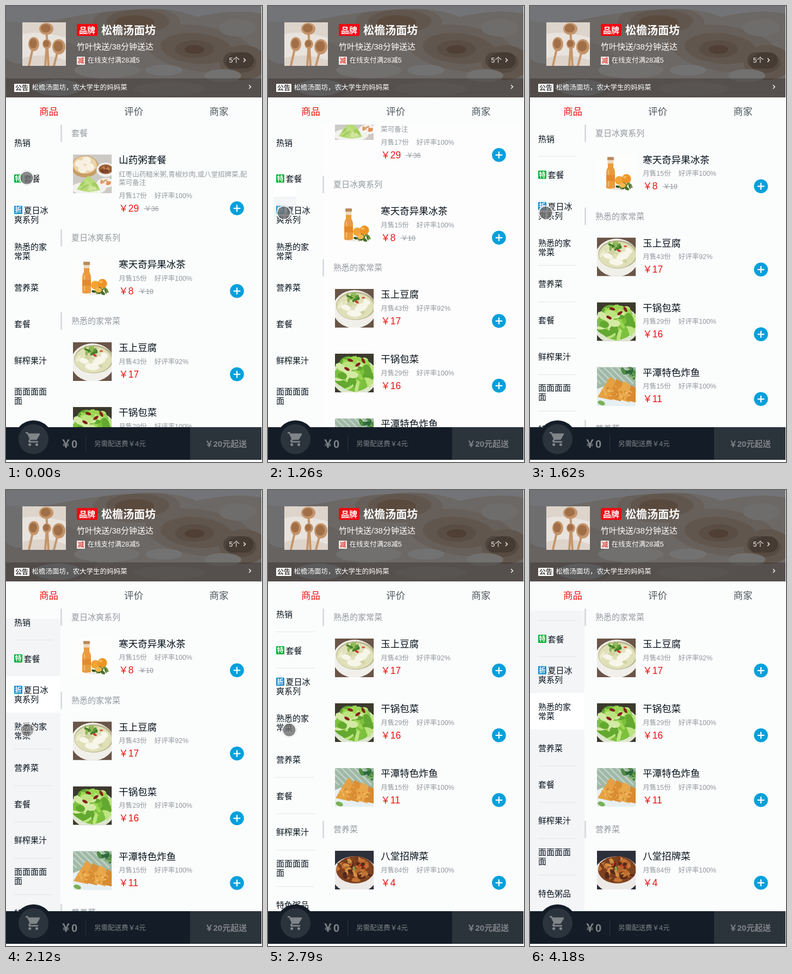
An HTML page for the animation above (4.45 s loop, 470 by 838 pixels).

```html
<!DOCTYPE html>
<html lang="zh-CN">
<head>
<meta charset="utf-8">
<title>点餐页面</title>
<style>
html, body { margin: 0; width: 100%; height: 100%; overflow: hidden; background: #fff; }
#stage { position: fixed; left: 0; top: 0; display: block;
  font-family: "Liberation Sans", "Noto Sans CJK SC", "Noto Sans CJK", sans-serif; }
</style>
</head>
<body>
<svg id="stage" width="470" height="838" viewBox="0 0 470 838"></svg>
<script>
const LOOP = 4450;
const LIGHT = 300;
const stage = document.getElementById('stage');

function add(parent, tag, attrs) {
  const node = document.createElementNS('http://www.w3.org/2000/svg', tag);
  for (const k in attrs) node.setAttribute(k, attrs[k]);
  return parent.appendChild(node);
}
const rect = (p, x, y, width, height, fill, rx = 0) => add(p, 'rect', { x, y, width, height, fill, rx });
const oval = (p, cx, cy, rx, ry, fill, turn = 0) =>
  add(p, 'ellipse', { cx, cy, rx, ry, fill, transform: `rotate(${turn} ${cx} ${cy})` });
const path = (p, d, fill, stroke = 'none', width = 1) =>
  add(p, 'path', { d, fill, stroke, 'stroke-width': width, 'stroke-linecap': 'round' });
// Text is placed by its left edge and vertical middle.
function text(p, str, x, mid, size, fill, weight = 400) {
  const node = add(p, 'text', { x, y: mid + size * 0.38, 'font-size': size, fill, 'font-weight': weight });
  node.textContent = str;
  return node;
}
// A clipped window that keeps stage coordinates.
const pane = (p, x, y, width, height) =>
  add(p, 'svg', { x, y, width, height, viewBox: `${x} ${y} ${width} ${height}` });
const chevron = (p, x, y) => path(p, `M${x - 1.5} ${y - 3}l3 3l-3 3`, 'none', '#fff', 1.4);
const badge = (p, str, x, y, fill, ink = '#fff') => {
  rect(p, x, y, 15, 15, fill, 1);
  text(p, str, x + 1.5, y + 7.5, 12, ink, 700);
};
function random(seed) {
  return () => (seed = (seed * 16807) % 2147483647) / 2147483647;
}
function scatter(p, n, seed, cx, cy, rx, ry, size, colors) {
  const rnd = random(seed);
  for (let i = 0; i < n; i++) {
    const a = rnd() * 6.283, r = Math.sqrt(rnd());
    oval(p, cx + Math.cos(a) * r * rx, cy + Math.sin(a) * r * ry,
      size * (0.6 + rnd() * 0.6), size * (0.25 + rnd() * 0.3), colors[i % colors.length], rnd() * 180);
  }
}

/* ---------- dishes ---------- */
const photos = {
  dimsum(p) {
    rect(p, 0, 0, 71, 71, '#cdcac6');
    oval(p, 22, 22, 25, 20, '#c99d63');
    oval(p, 22, 19, 22, 16, '#ead3a8');
    [[12, 17], [25, 11], [31, 23], [18, 27]].forEach(([x, y]) => oval(p, x, y, 8, 7, '#f8f1e3'));
    oval(p, 60, 28, 17, 13, '#f3f1ee');
    oval(p, 60, 27, 13, 9, '#9b5f38');
    scatter(p, 10, 31, 60, 27, 9, 5, 4, ['#c68950', '#77412a']);
    oval(p, 60, 52, 16, 9, '#f5f3f0');
    scatter(p, 9, 17, 61, 51, 9, 4, 4, ['#e58d52', '#d7a36c']);
    oval(p, 29, 62, 32, 12, '#f2f2ed');
    path(p, 'M7 64Q18 46 28 39Q41 46 50 65Q30 72 7 64Z', '#b8d979');
    scatter(p, 22, 9, 28, 58, 17, 8, 6, ['#cfe79d', '#a4cd60', '#bddf82']);
  },
  juice(p) {
    rect(p, 0, 0, 71, 71, '#fdfdfc');
    rect(p, 19, 5, 12, 6, '#b98a5c', 1);
    rect(p, 19.5, 11, 11, 9, '#ecd9bd');
    path(p, 'M20 17H30V24Q33 28 33 33V62Q25 65 17 62V33Q17 28 20 24Z', '#eb9a3c');
    path(p, 'M21 30V58', 'none', '#f3b868', 2.5);
    rect(p, 17, 38, 16, 11, '#e58a2c');
    oval(p, 44, 64, 20, 2, '#ece9e4');
    scatter(p, 16, 44, 50, 58, 14, 5, 5, ['#496f27', '#2f4d20', '#6d913b']);
    oval(p, 41, 48, 8, 8, '#f2a437');
    oval(p, 54, 45, 8.5, 8.5, '#ee9424');
    oval(p, 47, 57, 6, 4.5, '#f6b850');
    oval(p, 51, 42, 3, 2.5, '#f8b85c');
  },
  tofu(p) {
    rect(p, 0, 0, 71, 71, '#6a5548');
    oval(p, 36, 37, 40, 35, '#f1efea');
    oval(p, 38, 31, 36, 26, '#b9b58d');
    oval(p, 37, 32, 34, 24, '#dfe0b8');
    scatter(p, 12, 5, 32, 34, 26, 14, 9, ['#edecd0', '#d0d3a2', '#e6e6c4']);
    [[20, 34, 9, 5, 15], [48, 34, 13, 7, -25], [35, 45, 13, 6, 5], [58, 24, 7, 5, 30]]
      .forEach(([x, y, a, b, r]) => oval(p, x, y, a, b, '#f7f6ea', r));
    scatter(p, 15, 21, 31, 15, 11, 8, 5, ['#5f9737', '#91b955', '#3f7a2a']);
    oval(p, 40, 24, 4, 2, '#c83a28', 30);
    oval(p, 52, 16, 3, 1.6, '#d94b34');
  },
  cabbage(p) {
    rect(p, 0, 0, 71, 71, '#3c3a2d');
    oval(p, 36, 42, 42, 35, '#dde6cf');
    oval(p, 36, 38, 35, 31, '#7cbc3c');
    scatter(p, 64, 73, 36, 37, 32, 28, 13, ['#9bd650', '#7cc13d', '#bde480', '#63a830', '#d3eaa3']);
    [[28, 12, 20], [42, 20, -35], [52, 13, 60], [22, 28, 30]]
      .forEach(([x, y, r]) => oval(p, x, y, 5.5, 2.6, '#831f1b', r));
  },
  fish(p) {
    rect(p, 0, 0, 71, 71, '#9fb9a6');
    for (let i = -2; i < 9; i++) path(p, `M${i * 12} 0l30 30`, 'none', '#c3d3c8', 2.5);
    scatter(p, 16, 55, 60, 10, 14, 11, 7, ['#4f8c45', '#77ad5f', '#2f693b']);
    oval(p, 35, 57, 48, 24, '#e6eff2');
    [['M1 55L24 18L33 24L28 61Z', '#e5a143'], ['M20 57L36 22L47 28L44 63Z', '#dc8f34'],
     ['M36 58L49 26L60 32L60 65Z', '#e9a84a'], ['M53 61L62 33L71 38V65Z', '#d88a30']]
      .forEach(([d, c]) => path(p, d, c));
    scatter(p, 30, 83, 36, 46, 28, 13, 3, ['#f2bf68', '#cf8430', '#e9aa4c']);
    oval(p, 8, 66, 7, 4, '#79b055', 20);
  },
  stew(p) {
    rect(p, 0, 0, 71, 71, '#2d2f3a');
    oval(p, 36, 44, 42, 34, '#ece9e7');
    oval(p, 37, 35, 35, 25, '#7d4220');
    scatter(p, 52, 39, 37, 33, 30, 21, 8, ['#b5642a', '#7a3a1d', '#d68f45', '#552a1b', '#c47433']);
    scatter(p, 7, 12, 38, 29, 21, 14, 4, ['#d64325', '#8c9a42']);
  }
};

/* ---------- dish list ---------- */
const listPane = pane(stage, 100, 218, 370, 556);
const listBack = rect(listPane, 100, 218, 370, 556, '#fbfdfc');
const list = add(listPane, 'g', {});

function heading(y, name) {
  rect(list, 100, y, 3, 32, '#d9dde1');
  text(list, name, 120, y + 15.5, 15, '#93999f');
}
function dish(top, photo, name, sold, rate, price, old, notes = []) {
  const drop = notes.length ? 40 : 0;
  photos[photo](add(list, 'svg', { x: 123, y: top, width: 71, height: 71 }));
  text(list, name, 207, top + 9.7, 17.5, '#07111b', LIGHT);
  notes.forEach((line, i) => text(list, line, 207, top + 36 + i * 15, 12.5, '#93999f'));
  text(list, `月售${sold}份`, 207, top + 35 + drop, 12.5, '#93999f');
  text(list, `好评率${rate}%`, 272.5, top + 35 + drop, 12.5, '#93999f');
  text(list, `￥${price}`, 207, top + 58 + drop, 17.5, '#f01414');
  if (old) {
    const x = 234.5 + String(price).length * 9.75;
    text(list, `￥${old}`, x, top + 59 + drop, 12.5, '#93999f');
    rect(list, x - 1, top + 59 + drop, 27.5, 1, '#93999f');
  }
  const y = top + 58.8 + drop;
  oval(list, 424, y, 12.8, 12.8, '#00a0dc');
  path(list, `M418.5 ${y}h11M424 ${y - 5.5}v11`, 'none', '#fff', 2.2);
}
heading(218, '套餐');
dish(273, 'dimsum', '山药粥套餐', 17, 100, 29, 36, ['红枣山药糙米粥,青椒炒肉,或八堂招牌菜,配', '菜可备注']);
heading(410, '夏日冰爽系列');
dish(465, 'juice', '寒天奇异果冰茶', 15, 100, 8, 10);
heading(563, '熟悉的家常菜');
dish(618, 'tofu', '玉上豆腐', 43, 92, 17);
dish(737, 'cabbage', '干锅包菜', 29, 100, 16);
dish(856, 'fish', '平潭特色炸鱼', 15, 100, 11);
heading(953, '营养菜');
dish(1008, 'stew', '八堂招牌菜', 84, 100, 4);

/* ---------- side menu ---------- */
const ROW = 66.86;
const menuPane = pane(stage, 0, 218, 100, 556);
rect(menuPane, 0, 218, 100, 556, '#fbfdfc');
const menuGrey = rect(menuPane, 0, 237, 100, 600, '#f3f5f7');
const patch = add(menuPane, 'g', {});
rect(patch, 11, 302, 41, 48, '#fff');
rect(patch, 11, 350, 41, 25, '#f3f5f7');
const patchTail = rect(patch, 11, 375, 32, 19, '#f3f5f7');
const menu = add(menuPane, 'g', {});
const menuActive = rect(menu, 0, 0, 100, ROW, '#fff');
const rules = [];
[['热销'], ['套餐'], ['夏日冰', '爽系列'], ['熟悉的家', '常菜'], ['营养菜'],
 ['套餐'], ['鲜榨果汁'], ['面面面面', '面'], ['特色粥品']].forEach((lines, i) => {
  const mid = 243.8 + 66.7 * i - (lines.length - 1) * 9;
  const mark = { 1: ['特', '#08b03c'], 2: ['折', '#1990d2'] }[i];
  if (mark) badge(menu, mark[0], 15, mid - 8, mark[1]);
  lines.forEach((s, n) => text(menu, s, mark && !n ? 32.5 : 15, mid + n * 17, 15, '#07111b'));
  rules.push(rect(menu, 15, 275.7 + ROW * i, 70, 1, '#e2e5e7'));
});

/* ---------- header ---------- */
const head = pane(stage, 0, 0, 470, 168);
rect(head, 0, 0, 470, 168, '#6c6865');
// Blurred backdrop in flat contour bands.
[[60, 120, 110, 60, '#676361'], [25, 60, 40, 46, '#6f6e6f'], [240, 30, 80, 30, '#675f59'],
 [355, 78, 100, 42, '#675f59', 8], [242, 28, 58, 21, '#61564d'], [350, 78, 66, 28, '#61564d', 5],
 [236, 30, 36, 13, '#5a4a3e'], [346, 79, 36, 16, '#5a4d43'], [346, 80, 18, 8, '#4f3f34'],
 [436, 104, 44, 32, '#61564d'], [432, 104, 28, 19, '#574a40'], [185, 118, 60, 15, '#71706f'],
 [290, 118, 34, 10, '#737272'], [398, 128, 34, 12, '#72716f'], [95, 150, 44, 15, '#77787b'],
 [300, 152, 66, 12, '#716e6c'], [425, 40, 34, 16, '#6f6d6b']]
  .forEach(b => oval(head, ...b));
path(head, 'M0 0H470V14Q420 4 350 20Q310 2 240 6T110 22T0 28Z', '#737478');
rect(head, 0, 133, 470, 35, 'rgba(30,24,22,.3)');

const avatar = pane(head, 30, 30, 80, 80);
rect(avatar, 30, 30, 80, 80, '#e9e3dd');
path(avatar, 'M30 52Q55 44 110 58V30H30ZM30 96Q65 84 110 100V110H30Z', '#ddd4cb');
[[74, 42, 13, 11, 78, 110], [51, 70, 10, 13, 42, 110], [75, 70, 8, 9, 72, 110], [97, 75, 12, 14, 88, 110]]
  .forEach(([x, y, a, b, hx, hy]) => {
    path(avatar, `M${x} ${y}L${hx} ${hy}`, 'none', '#c4966a', 4);
    oval(avatar, x, y, a, b, '#c4946a');
    oval(avatar, x - 1, y - 1, a * 0.7, b * 0.7, '#a06f48');
  });

rect(head, 130, 33, 38, 22, '#ee0a12', 2);
text(head, '品牌', 134, 44, 15, '#fff', 700);
text(head, '松檐汤面坊', 175, 44, 20, '#fff', 700);
text(head, '竹叶快送/38分钟送达', 130, 74, 15, '#fff');
badge(head, '减', 130, 93, '#f7efed', '#dc4a42');
text(head, '在线支付满28减5', 149.5, 99.5, 12.5, '#fff');
rect(head, 399, 85, 56, 30, 'rgba(0,0,0,.2)', 15);
text(head, '5个', 409.5, 99.5, 12.5, '#fff');
chevron(head, 438, 99.5);
rect(head, 15, 143, 28, 15, '#fff', 1);
text(head, '公告', 17, 150.5, 12, '#4a4645', 700);
text(head, '松檐汤面坊，农大学生的妈妈菜', 47.5, 149.5, 12.5, '#fff');
chevron(head, 448, 148.5);

rect(stage, 0, 168, 470, 50, '#fbfdfc');
[['商品', 61, '#f01414'], ['评价', 217, '#4d555d'], ['商家', 373.5, '#4d555d']]
  .forEach(([s, x, c]) => text(stage, s, x, 193, 17.5, c, LIGHT));

/* ---------- cart bar ---------- */
const DIM = '#80858a';
rect(stage, 0, 774, 470, 60, '#141d27');
rect(stage, 0, 834, 470, 4, '#fff');
rect(stage, 338, 774, 132, 60, '#2b333b');
const cart = pane(stage, 0, 755, 100, 79);
oval(cart, 50.5, 797, 35.5, 35.5, '#141d27');
oval(cart, 50.5, 796, 27.5, 27.5, '#2b343c');
path(cart, 'M7 18a2 2 0 1 0 0 4a2 2 0 1 0 0-4zM1 2v2h2l3.6 7.6-1.35 2.45C4.5 15.4 5.5 17 7 17h12v-2H7.4l.93-1.75h7.45c.75 0 1.41-.41 1.75-1.03L21.7 5Q21.8 4 20.8 4H5.2l-.94-2zM17 18a2 2 0 1 0 0 4a2 2 0 1 0 0-4z', DIM)
  .setAttribute('transform', 'translate(34.7 780.4) scale(1.28)');
text(stage, '￥0', 100, 804, 20, DIM, 700);
rect(stage, 146, 789, 1, 30, '#2b343d');
text(stage, '另需配送费￥4元', 162, 804, 12.5, DIM);
text(stage, '￥20元起送', 365.5, 804, 15, DIM, 700);
rect(stage, 469, 0, 1, 838, '#fff');

/* ---------- pointer ---------- */
const pointer = add(stage, 'g', {});
add(pointer, 'circle', { r: 13.5, fill: 'none', stroke: '#999', 'stroke-width': 0.8, 'stroke-dasharray': '2 2' });
add(pointer, 'circle', { r: 12.4, fill: 'none', stroke: '#fff', 'stroke-width': 1.8, 'stroke-opacity': 0.9 });
const dot = add(pointer, 'circle', { r: 11.5, fill: '#6c6c6c' });

/* ---------- timeline: each row holds until the next ---------- */
const listSteps = [ // time, scroll, background
  [0, 0, '#fbfdfc'], [1260, 98, '#fdfdfd'], [1380, 177, '#fdfdfd'], [1500, 189, '#fbfcfc'], [1620, 192.5, '#fbfcfc'],
  [2520, 256.5, '#fdfdfd'], [2640, 331, '#fdfdfd'], [2790, 345, '#fbfcfc']
];
const menuSteps = [ // time, shift, active row, top of the grey fill
  [0, 7, -1, 0], [1500, 2, 2, 0], [1620, 0, 2, 0], [1760, -0.5, 2, 237],
  [2790, -15.5, 3, 0], [2910, -33, 3, 0], [3060, -36.5, 3, 222]
];
const pointerSteps = [ // time, x, y, strength
  [0, 38, 316, 0.8], [560, 25, 361, 0.55], [710, 29, 380, 0.55], [830, 29, 380, 0.8],
  [2000, 34, 408, 0.55], [2120, 39, 441, 0.55], [2250, 39, 441, 0.8],
  [3490, 0, 0, 0], [4050, 368, 821, 0.55], [4180, 0, 0, 0]
];
const at = (steps, t) => steps.filter(s => s[0] <= t).pop();
const show = (node, on) => node.setAttribute('visibility', on ? 'visible' : 'hidden');

function draw(t) {
  const [, scroll, back] = at(listSteps, t);
  list.setAttribute('transform', `translate(0 ${-scroll})`);
  listBack.setAttribute('fill', back);

  const [, shift, active, greyTop] = at(menuSteps, t);
  menu.setAttribute('transform', `translate(0 ${shift})`);
  menuGrey.setAttribute('y', greyTop);
  show(menuGrey, greyTop);
  menuActive.setAttribute('y', 276 + ROW * (active - 1));
  show(menuActive, greyTop);
  rules.forEach((rule, i) => show(rule, active > 0 && i !== active && i !== active - 1));
  show(patch, t >= 560 && t < 1500);
  show(patchTail, t >= 710 && t < 1500);

  const [, x, y, strength] = at(pointerSteps, t);
  pointer.setAttribute('transform', `translate(${x} ${y})`);
  show(pointer, strength);
  dot.setAttribute('fill-opacity', strength);
}

const start = performance.now();
function tick() {
  draw((performance.now() - start) % LOOP);
  requestAnimationFrame(tick);
}
draw(0);
requestAnimationFrame(tick);
</script>
</body>
</html>
```
